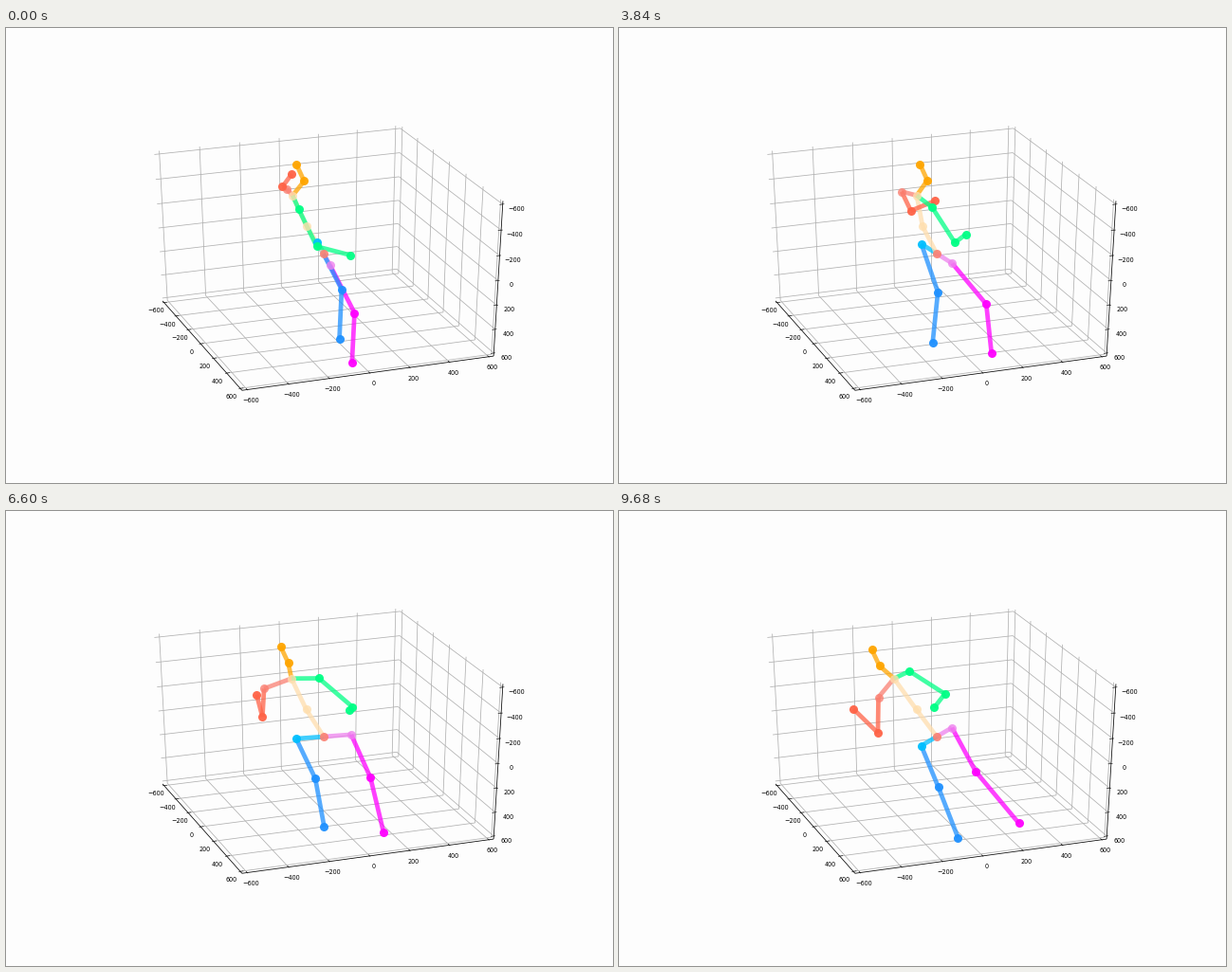
Write a matplotlib script that moves like this. It is 640 by 480 pixels and loops after 9720 ms.

```python
import numpy as np
import matplotlib.pyplot as plt
from matplotlib.animation import FuncAnimation
from matplotlib.collections import LineCollection

W, H, DPI = 640, 480, 100
FRAMES, STEP = 243, 40
TICKS = range(-600, 601, 200)
HALF = 625

fig = plt.figure(figsize=(W / DPI, H / DPI), dpi=DPI, facecolor="#fdfdfd")
ax = fig.add_axes([0, 0, 1, 1])
ax.set_xlim(0, W)
ax.set_ylim(H, 0)
ax.axis("off")

# Perspective camera, box coordinates -1..1 with z pointing down
AZIM, ELEV = np.radians(20), np.radians(30)
CENTER, SCALE, SQUASH, DIST = (335, 238), 139.6, 0.664, 19.2


def project(x, y, z):
    right = x * np.cos(AZIM) + y * np.sin(AZIM)
    near = y * np.cos(AZIM) - x * np.sin(AZIM)
    down = z * np.cos(ELEV) + near * np.sin(ELEV)
    toward = near * np.cos(ELEV) - z * np.sin(ELEV)
    s = SCALE / (1 - toward / DIST)
    return CENTER[0] + s * right, CENTER[1] + s * SQUASH * down


def segment(a, b):
    return [project(*a), project(*b)]


def label(value, point):
    text = str(value).replace("-", "\u2212")
    ax.text(*project(*point), text, fontsize=4.7, ha="center", va="center",
            color="black", family="DejaVu Sans", zorder=3)


def draw_box():
    grid, ticks = [], []
    inner, outer = 0.975, 1.012
    for value in TICKS:
        t = value / HALF
        grid += [
            segment((t, -1, 1), (t, 1, 1)), segment((t, -1, -1), (t, -1, 1)),
            segment((-1, t, 1), (1, t, 1)), segment((1, t, -1), (1, t, 1)),
            segment((-1, -1, t), (1, -1, t)), segment((1, -1, t), (1, 1, t)),
        ]
        ticks += [
            segment((t, inner, 1), (t, outer, 1)),
            segment((-inner, t, 1), (-outer, t, 1)),
            segment((inner, 1, t), (outer, 1, t)),
        ]
        label(value, (t, 1.074, 1.1))
        label(value, (-1.074, t, 1.1))
        label(value, (1.05, 1.124, t))
    edges = [segment((-1, -1, 1), (-1, 1, 1)),
             segment((-1, 1, 1), (1, 1, 1)),
             segment((1, 1, 1), (1, 1, -1))]
    for parts, color, width in ((grid, "#b0b0b0", 0.55), (edges, "black", 0.55),
                                (ticks, "black", 0.4)):
        ax.add_collection(LineCollection(parts, colors=color, linewidths=width))


draw_box()

# Walker, lengths in millimetres
HIP, SHOULDER, LEG_BONE = 133, 130, 430
STRIDE = 3.45
FACING_RIGHT = np.pi / 2 + AZIM


def ease(t, start, end):
    u = np.clip((t - start) / (end - start), 0, 1)
    return u * u * (3 - 2 * u)


def step(heading, forward, side, down):
    """Offset of a bone, given in the frame of a body with this heading."""
    c, s = np.cos(heading), np.sin(heading)
    return np.array([forward * s + side * c, side * s - forward * c, down])


def pose(t):
    turn = ease(t, 2, 9.5)
    walk = ease(t, 1.3, 2.4)
    rest = 1 - walk
    sway = np.cos(2 * np.pi * (t - 3.2) / 12.8)
    heading = np.radians(97 - 134 * turn)

    def body(forward, side, down):
        return step(heading, forward, side, down)

    def tilt(right, down):
        return step(FACING_RIGHT, right, 0, down)

    def leg(forward, lean):
        down = np.sqrt(LEG_BONE ** 2 - forward ** 2 - lean ** 2)
        return body(forward, 0, down) + tilt(lean, 0)

    p = {"root": np.zeros(3)}
    p["spine"] = tilt(15 * sway - 80, -220)
    p["chest"] = p["spine"] + tilt(39 * sway - 64, -248)
    p["neck"] = p["chest"] + body(55 + 25 * turn, 0, 30 * turn - 107)
    p["head"] = p["neck"] + tilt(-34, -127)

    for name, side in (("r", 1), ("l", -1)):
        def swing(lag):
            return -side * walk * np.cos(2 * np.pi * (t - 2.5 - lag) / STRIDE)

        thigh = 120 - 35 * turn + (75 - 50 * turn) * swing(0)
        shank = -10 - 90 * turn ** 3 + (85 - 15 * turn) * swing(0.25)
        p[name + "_hip"] = body(0, side * HIP, side * (20 - 30 * turn))
        p[name + "_knee"] = p[name + "_hip"] + leg(thigh, 170 * turn)
        p[name + "_foot"] = p[name + "_knee"] + leg(shank, 70 * turn)

    p["r_shoulder"] = p["chest"] + body(0, SHOULDER, 40 - 40 * turn)
    p["r_elbow"] = p["r_shoulder"] + body(50 - 150 * turn, 150, 220)
    p["r_hand"] = p["r_elbow"] + body(60 + 100 * rest, 0, 210 * turn - 80 + 170 * rest)

    p["l_shoulder"] = p["chest"] + body(0, -SHOULDER, 15 + 75 * turn)
    p["l_elbow"] = p["l_shoulder"] + body(60 - 60 * turn - 80 * rest, -10 * turn,
                                          150 + 130 * turn - 170 * rest)
    p["l_hand"] = p["l_elbow"] + body(135 - 90 * rest, 0, -20 - 130 * turn - 75 * rest)
    return {joint: project(*(point / HALF)) for joint, point in p.items()}


# Each chain of bones, with the colour of every bone and the joint it ends in
GREEN = "#00ff85"
CHAINS = [
    ("root r_hip r_knee r_foot", "violet magenta magenta"),
    ("root l_hip l_knee l_foot", "deepskyblue dodgerblue dodgerblue"),
    ("root spine chest neck head", "navajowhite navajowhite orange orange"),
    ("chest l_shoulder l_elbow l_hand", "salmon tomato tomato"),
    ("chest r_shoulder r_elbow r_hand", f"{GREEN} {GREEN} {GREEN}"),
]
bones, dots = [], {}


def add_dot(joint, color, alpha, zorder=6):
    dots[joint], = ax.plot([], [], "o", color=color, ms=6.5, mew=0,
                           alpha=alpha, zorder=zorder)


for names, colors in CHAINS:
    joints = names.split()
    for start, end, color in zip(joints, joints[1:], colors.split()):
        line, = ax.plot([], [], color=color, lw=3.4, alpha=0.75,
                        solid_capstyle="butt", zorder=5)
        bones.append((line, start, end))
        soft = end in ("spine", "chest", "l_shoulder", "r_hip")
        add_dot(end, color, 0.8 if soft else 0.95)
add_dot("root", "salmon", 0.9, 7)


def update(frame):
    joints = pose(frame * STEP / 1000)
    for line, start, end in bones:
        line.set_data(*zip(joints[start], joints[end]))
    for joint, dot in dots.items():
        x, y = joints[joint]
        dot.set_data([x], [y])
    return [line for line, _, _ in bones] + list(dots.values())


anim = FuncAnimation(fig, update, frames=FRAMES, interval=STEP, repeat=True, repeat_delay=0)
plt.show()
```
